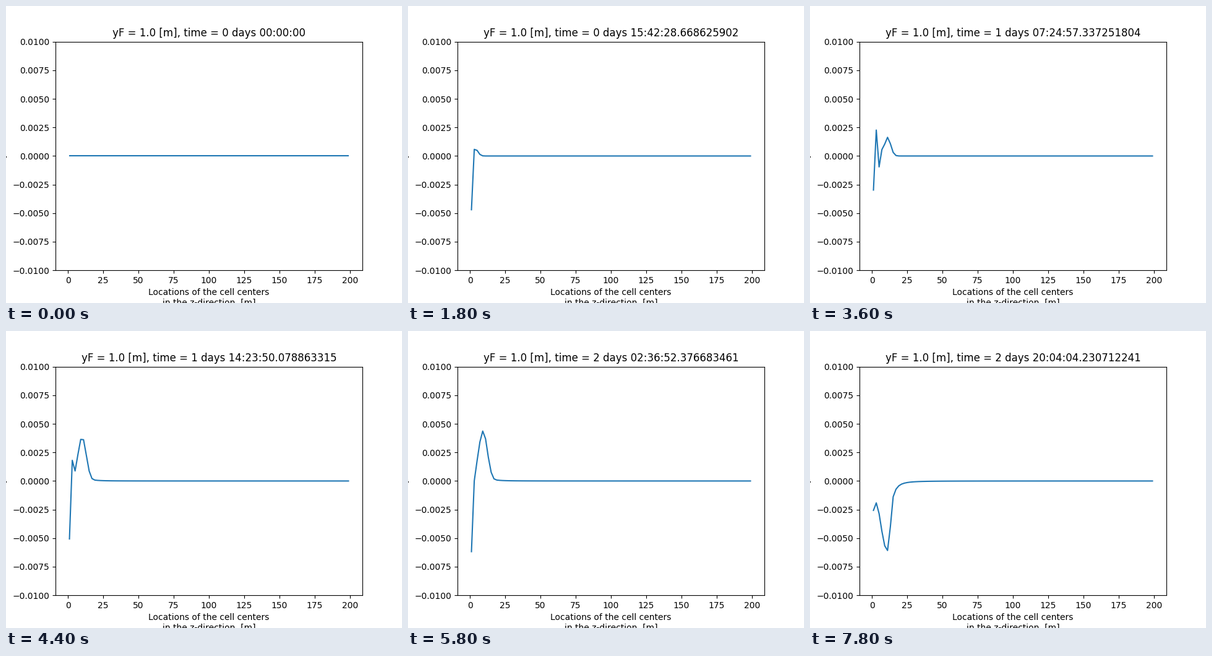
Write a matplotlib script that moves like this. It is 640 by 480 pixels and loops after 8000 ms.

```python
import numpy as np
import matplotlib.pyplot as plt
from matplotlib.animation import FuncAnimation
from matplotlib.patches import Rectangle

FRAMES = 40
STEP_NS = 6283185402877.976  # simulated nanoseconds per frame
z = np.arange(1, 200, 2.0)
cell = np.arange(len(z))

# Poses: frame, wall value, wall ringing, crest height (1e-3 units),
# crest position, width before and after it, strength of the far tail
POSES = np.array([
    (0, -4.7, 0, 0.2, 3, 1.5, 1.5, 0),
    (9, -4.7, 0, 0.62, 3.7, 1.9, 1.9, 0),
    (14, -4.25, 0.24, 1.6, 8.2, 2.6, 2.0, 0.1),
    (18, -2.98, -0.76, 1.63, 11, 2.2, 2.2, 0),
    (25, -4.38, 0.03, 5.5, 9.2, 3.5, 3.45, 0.45),
    (33, -4.5, 0.16, 3.25, 9.2, 2.75, 2.75, 0.1),
    (39, -2.57, 0.2, -6.1, 10.8, 4.7, 2.4, 0.7),
])
times = POSES[:, 0]


def pose(i):
    """Blend the poses; the wall value swings lower between them over time."""
    wall, *rest = (np.interp(i, times, col) for col in POSES.T[1:])
    phase = np.interp(i, times, range(len(times)))
    return wall - 0.06 * i * abs(np.sin(np.pi * phase)), *rest


def field(i):
    if i == 0:
        return np.zeros_like(z)
    wall, ring, height, pos, before, after, tail = pose(i)
    d = z - pos
    bell = np.exp(-(d / np.where(d < 0, before, after)) ** 2 / 2)
    far = tail / (1 + (np.maximum(d, 0) / 3) ** 2.2) * (d > 0)
    crest = height * np.maximum(bell, far)
    return 1e-3 * (crest + (wall - crest[0]) * ring ** (cell * cell))


def clock(i):
    secs, ns = divmod(round(i * STEP_NS), 10**9)
    days, secs = divmod(secs, 86400)
    text = f"{days} days {secs // 3600:02d}:{secs // 60 % 60:02d}:{secs % 60:02d}"
    return text + (f".{ns:09d}" if ns else "")


fig, ax = plt.subplots(figsize=(6.4, 4.8), dpi=100)
line, = ax.plot(z, np.zeros_like(z))
ax.set_ylim(-0.01, 0.01)
ax.set_xlabel("Locations of the cell centers\nin the z-direction, [m]")
title = ax.set_title("")

# Visible edge of the cut-off vertical label
fig.add_artist(Rectangle((0, 235 / 480), 1 / 640, 2 / 480, color="black", lw=0))


def update(i):
    line.set_ydata(field(i))
    title.set_text(f"yF = 1.0 [m], time = {clock(i)}")
    return line, title


anim = FuncAnimation(fig, update, frames=FRAMES, interval=200, repeat=True)
plt.show()
```
